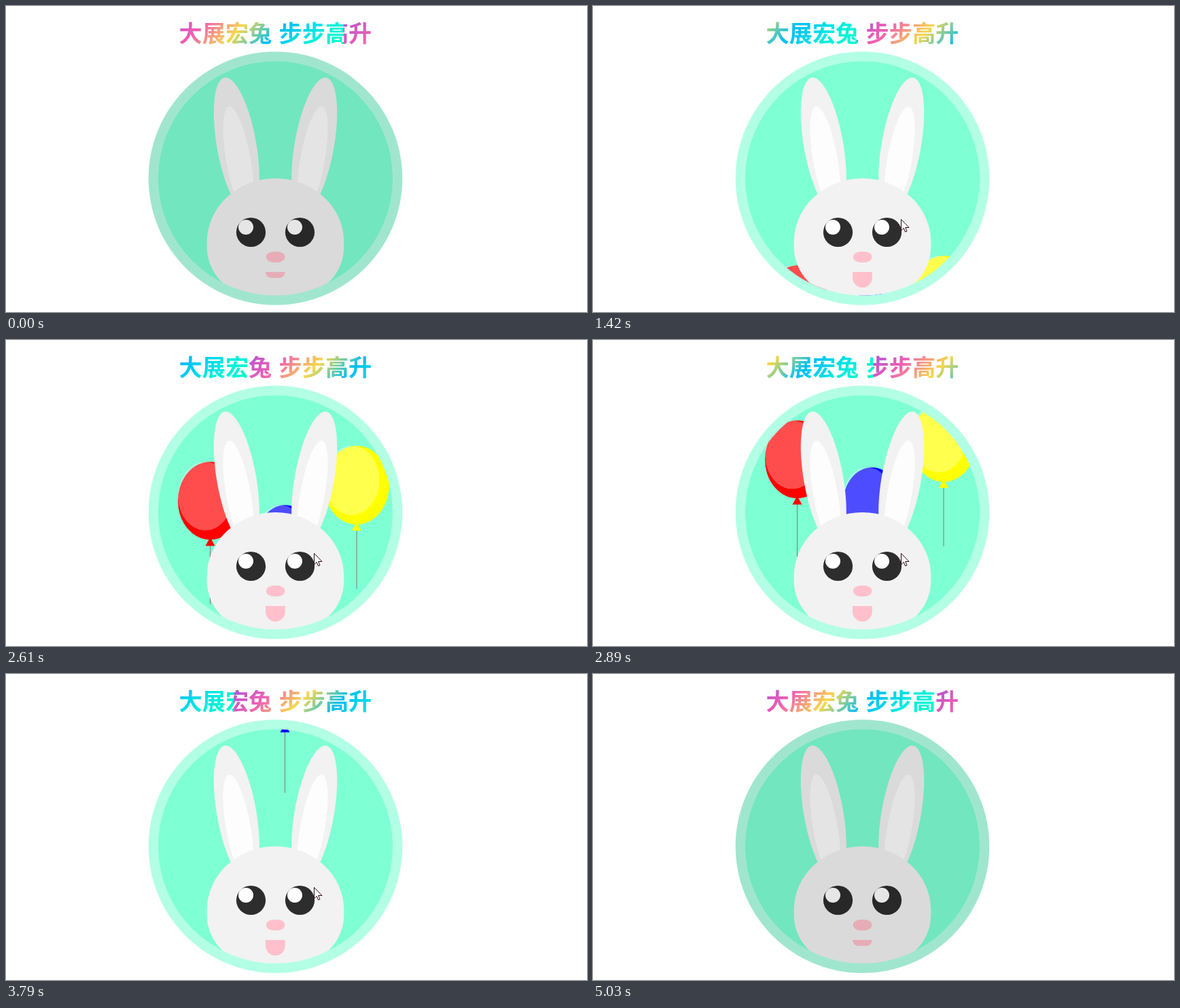
Write an HTML page that moves like this. It is 855 by 451 pixels and loops after 5360 ms.

```html
<!DOCTYPE html>
<html lang="zh">
<head>
<meta charset="utf-8">
<title>Bunny</title>
<style>
  html, body { margin: 0; width: 100%; height: 100%; overflow: hidden; background: #fff; }
  svg { display: block; width: 855px; height: 451px; }
  text { font: bold 34.2px "Noto Sans CJK SC", "Noto Sans CJK", "Noto Sans", sans-serif; }
</style>
</head>
<body>
<svg viewBox="0 0 855 451">
  <defs>
    <linearGradient id="rainbow" gradientUnits="userSpaceOnUse" x1="53" y1="-53" x2="205" y2="99">
      <stop offset="0" stop-color="#a855d8"/>
      <stop offset=".2" stop-color="#f05eb4"/>
      <stop offset=".4" stop-color="#f8d84c"/>
      <stop offset=".6" stop-color="#00bff5"/>
      <stop offset=".8" stop-color="#00ecdf"/>
      <stop offset="1" stop-color="#00ffc8"/>
    </linearGradient>
    <pattern id="tile" patternUnits="userSpaceOnUse" y="17" width="258" height="46">
      <rect width="258" height="46" fill="url(#rainbow)"/>
    </pattern>
    <clipPath id="disc"><circle cx="396.5" cy="254" r="172.7"/></clipPath>
    <g id="ear">
      <ellipse rx="29" ry="101" fill="#f2f2f2" transform="translate(339.3 205) rotate(-10)"/>
      <ellipse rx="18" ry="80" fill="#fdfdfd" transform="translate(342 227) rotate(-10)"/>
    </g>
    <g id="eye">
      <circle cx="360.5" cy="333.5" r="21.6" fill="#2d2d2d"/>
      <circle cx="353" cy="326" r="11" fill="#fff"/>
    </g>
  </defs>

  <g fill="url(#tile)">
    <text x="254.5" y="52.5">大展宏兔</text>
    <text x="401.5" y="52.5">步步高升</text>
  </g>

  <g id="badge">
    <circle cx="396.5" cy="254" r="186.8" fill="#b2ffe5"/>
    <g clip-path="url(#disc)">
      <circle cx="396.5" cy="254" r="172.7" fill="#7fffd4"/>
      <g id="balloons"></g>
      <use href="#ear"/>
      <use href="#ear" transform="matrix(-1 0 0 1 793 0)"/>
      <path fill="#f2f2f2" d="M295.7 348A100.8 94 0 0 1 497.3 348V355A72 72 0 0 1 425.3 427H367.7A72 72 0 0 1 295.7 355Z"/>
      <use href="#eye"/>
      <use href="#eye" x="72"/>
      <rect x="382.8" y="362" width="27.6" height="16" rx="11.5" ry="8" fill="#ffc0cb"/>
      <path id="mouth" fill="#ffc0cb"/>
    </g>
  </g>

  <path id="cursor" fill="#fff" stroke="#2a0a14" d="M.5.5V17L4.2 13.4 6.6 19 9 18 6.6 12.5H12Z"/>
</svg>

<script>
const LOOP = 5360, STEP = 69.4;
const HOVER = 745, LEAVE = 4672;
const $ = id => document.getElementById(id);
const clamp = v => Math.min(1, Math.max(0, v));

// y is the top edge at 1980 ms; each balloon rises with speed v and acceleration a
const balloons = [
  { x: 300.5, y: 298, w: 95, h: 115, len: 210, v: .170, a: 3.28e-5, color: '#f00' },
  { x: 410.5, y: 349, w: 85, h: 106, len: 204, v: .1486, a: 3.39e-5, color: '#00f' },
  { x: 516, y: 279, w: 96, h: 116, len: 211, v: .178, a: 3.17e-5, color: '#ff0' }
];

$('balloons').innerHTML = balloons.map(({ w, h, len, color }) => `
  <g>
    <path d="M0 ${h + 8}V${len}" stroke="#8c7868"/>
    <path d="M0 ${h - 4}L7 ${h + 9}H-7Z" fill="${color}"/>
    <ellipse cy="${h / 2}" rx="${w / 2}" ry="${h / 2}" fill="${color}"/>
    <ellipse cx="${-w * .075}" cy="${h * .44}" rx="${w * .425}" ry="${h * .44}" fill="#fff" opacity=".3"/>
  </g>`).join('');
const balloonNodes = [...$('balloons').children];

// Position of the gradient seam: [time, x]
const seam = [[520, 497], [860, 530], [1980, 762], [2610, 873], [3240, 1003], [3790, 1111], [4960, 1277]];

function track(points, t) {
  let i = 1;
  while (i < points.length - 1 && t > points[i][0]) i++;
  const [t0, a] = points[i - 1], [t1, b] = points[i];
  return a + (b - a) * clamp((t - t0) / (t1 - t0));
}

// CSS "ease": cubic-bezier(.25, .1, .25, 1)
function ease(x) {
  if (x <= 0 || x >= 1) return clamp(x);
  let lo = 0, hi = 1, s = .5;
  for (let i = 0; i < 20; i++) {
    s = (lo + hi) / 2;
    const bx = .75 * s * (1 - s) ** 2 + .75 * s * s * (1 - s) + s ** 3;
    if (bx < x) lo = s; else hi = s;
  }
  return .3 * s * (1 - s) ** 2 + 3 * s * s * (1 - s) + s ** 3;
}

function mouthPath(h) {
  const r = Math.min(14.4, h);
  return `M382 392h28.8v${h - r}a${r} ${r} 0 0 1 ${-r} ${r}h${2 * r - 28.8}a${r} ${r} 0 0 1 ${-r} ${-r}z`;
}

function draw(time) {
  // The picture holds at both ends and advances in even steps between
  const k = Math.min(64, Math.floor((time - 578) / STEP));
  const t = k < 0 ? 520 : 590 + k * STEP;
  const hover = t >= HOVER && t < LEAVE;

  $('tile').setAttribute('patternTransform', `translate(${track(seam, t) % 258} 0)`);
  $('badge').style.filter = hover ? 'none' : 'brightness(.9)';

  const open = ease((t - HOVER) / 500) - (k >= 64 ? 1 : ease((t - LEAVE) / 500));
  $('mouth').setAttribute('d', mouthPath(8.7 + 14.3 * open));

  $('balloons').style.display = hover ? '' : 'none';
  const dt = t - 1980;
  balloons.forEach(({ x, y, v, a }, i) =>
    balloonNodes[i].setAttribute('transform', `translate(${x} ${y - v * dt - a * dt * dt})`));

  const go = clamp((t - 4540) / 370);
  $('cursor').style.display = t >= HOVER && go < 1 ? '' : 'none';
  $('cursor').setAttribute('transform', `translate(${453 + 270 * go} ${314 + 135 * go})`);
}

const start = performance.now();
function tick() {
  draw((performance.now() - start) % LOOP);
  requestAnimationFrame(tick);
}
tick();
</script>
</body>
</html>
```
